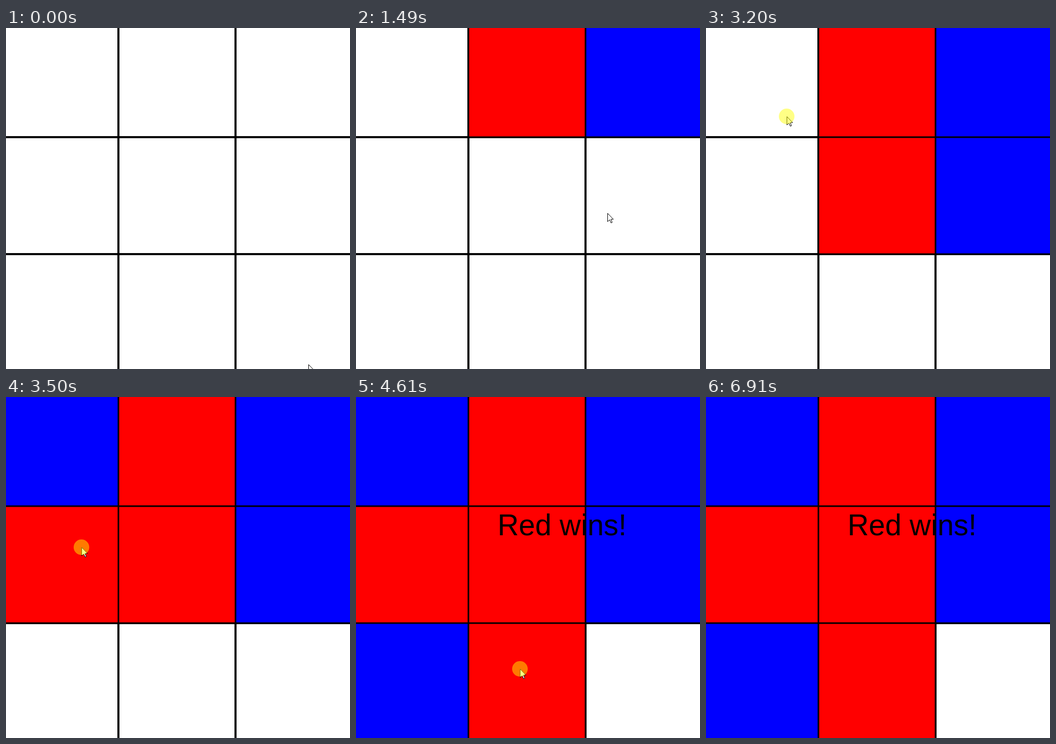
Recreate the animation shown at these times as an HTML page. Size 661 by 656 pixels, loop 7310 ms.

```html
<!DOCTYPE html>
<html lang="en">
<head>
<meta charset="utf-8">
<title>Grid game</title>
<style>
  html, body { margin: 0; width: 100%; height: 100%; overflow: hidden; background: #fff; }
  svg { display: block; width: 661px; height: 656px; }
  .lines { stroke: #000; stroke-width: 4; fill: none; }
  text { font: 56.5px "Liberation Sans", Arial, sans-serif; }
</style>
</head>
<body>
<svg viewBox="0 0 661 656">
  <path class="lines" d="M216 0V656M441 0V656M0 210H661M0 435H661"/>
  <g id="cells"></g>
  <text id="result" x="272" y="266">Red wins!</text>
  <g id="pointer">
    <path d="M.5 .5V16.5L4.3 13L7 19L9.3 18L6.8 12H11.5Z" fill="#fff" stroke="#000"/>
    <circle id="press" r="15" fill="#ff0" fill-opacity=".48"/>
  </g>
</svg>
<script>
const LOOP = 7310, STEP = 100, REST = 200, EXIT = 6900;
const CELL = 225, LEFT = -9, TOP = -15, INSET = 1.5;
const byId = id => document.getElementById(id);

// each click fills the cell under the pointer; blue and red alternate
const clicks = [
  { t: 700, x: 505, y: 152 },
  { t: 1200, x: 354, y: 148 },
  { t: 1700, x: 483, y: 356 },
  { t: 2500, x: 359, y: 363 },
  { t: 3200, x: 155, y: 170 },
  { t: 3400, x: 145, y: 289 },
  { t: 3800, x: 138, y: 480 },
  { t: 4500, x: 315, y: 523 }
];

// the pointer enters, clicks through the game and wanders off
const stops = [
  { t: -STEP, x: 581, y: 647 },
  { t: 500, x: 492, y: 152 },
  ...clicks,
  { t: 5400, x: 539, y: 511 },
  { t: 6000, x: 565, y: 503 },
  { t: 7000, x: 574, y: 594 }
];

const cells = clicks.map(({ x, y }, i) => {
  const rect = document.createElementNS("http://www.w3.org/2000/svg", "rect");
  const snap = (v, origin) => origin + Math.floor((v - origin) / CELL) * CELL + INSET;
  const attrs = {
    x: snap(x, LEFT), y: snap(y, TOP),
    width: CELL - 2 * INSET, height: CELL - 2 * INSET,
    fill: i % 2 ? "#f00" : "#00f"
  };
  for (const name in attrs) rect.setAttribute(name, attrs[name]);
  byId("cells").append(rect);
  return rect;
});

// leave one step after each stop, arrive a short rest before the next
function tipAt(t) {
  const next = stops.findIndex(s => s.t + STEP > t);
  const from = stops[next - 1], to = stops[next];
  const leave = from.t + STEP;
  const k = Math.min(1, (t - leave) / Math.max(STEP, to.t - REST - leave));
  const ease = k * k * (3 - 2 * k);
  const mix = (a, b) => Math.round(a + (b - a) * ease);
  return [mix(from.x, to.x), mix(from.y, to.y)];
}

const show = (el, on) => { el.style.display = on ? "" : "none"; };

function draw(now) {
  // the screen refreshes ten times a second
  const t = Math.floor((now % LOOP + 10) / STEP) * STEP;
  const filled = clicks.filter(c => t >= c.t + STEP).length;
  cells.forEach((cell, i) => show(cell, i < filled));
  show(byId("result"), filled === clicks.length);
  show(byId("pointer"), t < EXIT);
  show(byId("press"), clicks.some(c => t >= c.t && t <= c.t + STEP));
  byId("pointer").setAttribute("transform", `translate(${tipAt(Math.min(t, EXIT))})`);
}

const start = performance.now();
function tick() {
  draw(performance.now() - start);
  requestAnimationFrame(tick);
}
tick();
</script>
</body>
</html>
```
